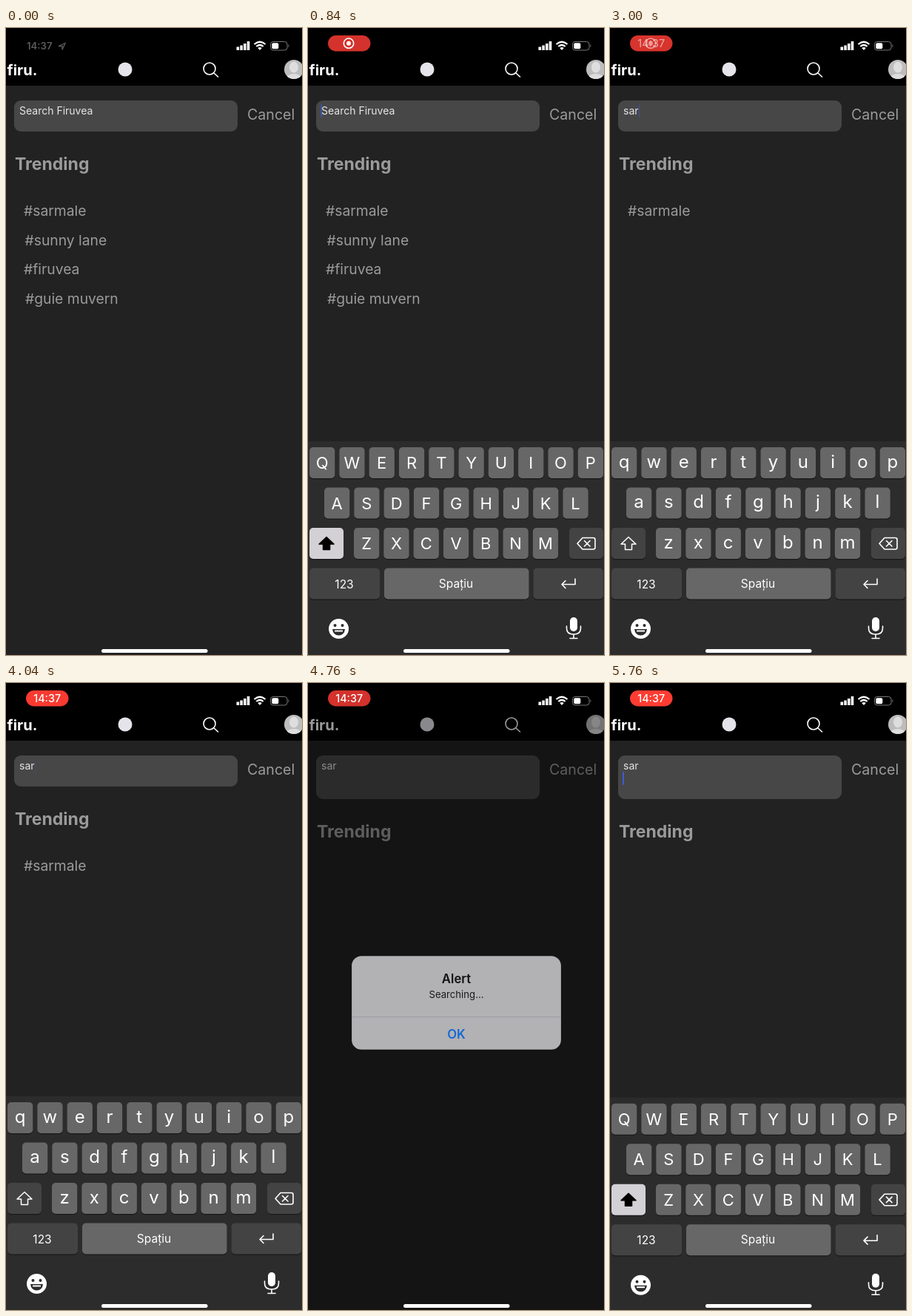
Recreate the animation shown at these times as an HTML page. Size 400 by 848 pixels, loop 5800 ms.

```html
<!DOCTYPE html>
<html lang="ro">
<head>
<meta charset="utf-8">
<title>Search</title>
<style>
html, body { margin: 0; width: 100%; height: 100%; overflow: hidden; background: #000; }
svg { display: block; width: 400px; height: 848px; font-family: Inter, "Open Sans", sans-serif; }
.mid { text-anchor: middle; }
.line { fill: none; stroke: #fff; stroke-width: 1.6; stroke-linecap: round; stroke-linejoin: round; }
</style>
</head>
<body>
<svg viewBox="0 0 400 848">
  <rect width="400" height="848" fill="#222"/>
  <rect width="400" height="78" fill="#000"/>

  <text x="1.5" y="64" font-size="20" font-weight="700" fill="#fff">firu.</text>
  <circle cx="161" cy="56" r="9.5" fill="#e4e4ea"/>
  <g class="line"><circle cx="275" cy="55" r="8"/><path d="M281 61l5.500 5"/></g>
  <clipPath id="face"><circle cx="389" cy="56" r="13"/></clipPath>
  <g clip-path="url(#face)">
    <rect x="375" y="42" width="28" height="28" fill="#bdbdbd"/>
    <ellipse cx="389" cy="53" rx="6" ry="7.500" fill="#dedede"/>
    <ellipse cx="389" cy="69" rx="11" ry="7" fill="#dedede"/>
  </g>

  <rect id="field" x="11" y="98" width="302" height="42" rx="9" fill="#474747"/>
  <text id="query" x="18" y="117" font-size="14" fill="#e6e6e6"></text>
  <rect id="cursor" y="103" width="2" height="18" rx="1" fill="#3b5ce0"/>
  <text x="326" y="124" font-size="19.600" fill="#9b9b9b">Cancel</text>
  <g id="results" fill="#9b9b9b">
    <text x="12" y="192" font-size="23" font-weight="700">Trending</text>
    <g id="tags" font-size="19.300"></g>
  </g>

  <rect id="dim" width="400" height="848" fill="#000"/>
  <g id="alert">
    <rect x="61" y="370" width="279" height="125" rx="13" fill="#bebdc0"/>
    <path d="M61 451.500H340" stroke="#a5a5a9"/>
    <g class="mid">
      <text x="200.500" y="406" font-size="16.500" font-weight="600" fill="#111">Alert</text>
      <text x="200.500" y="426.500" font-size="13" fill="#1c1c1c">Searching...</text>
      <text x="200.500" y="480" font-size="16.500" font-weight="600" fill="#1470e6">OK</text>
    </g>
  </g>

  <g id="keyboard">
    <rect y="559" width="400" height="300" fill="#2c2c2c"/>
    <g id="keys" class="mid" fill="#fff"></g>
    <path id="shift" d="M25 688.500l-10 9.500h5.500v7.500h9V698h5.500z" stroke-width="1.500" stroke-linejoin="round"/>
    <path class="line" d="M371 689.500h14.500q2.500 0 2.500 2.500v10.500q0 2.500-2.500 2.500H371l-7-7.800zM373.500 693.500l7.500 7.500m0-7.500l-7.500 7.500"/>
    <path class="line" d="M361 745v7.500H343m5-5l-5 5 5 5"/>
    <circle cx="41.500" cy="812.500" r="13.500" fill="#fff"/>
    <g fill="#2c2c2c">
      <circle cx="36.500" cy="808" r="2"/><circle cx="46.500" cy="808" r="2"/>
      <path d="M33 813h17q-1 8.500-8.500 8.500T33 813z"/>
    </g>
    <path d="M36 815.500h11" stroke="#fff" stroke-width="2"/>
    <rect x="354" y="797" width="10" height="19" rx="5" fill="#fff"/>
    <path class="line" d="M349.500 809v3q0 8 9.500 8t9.500-8v-3M359 820v5.500m-5 0h10"/>
  </g>

  <g id="clock" fill="#5c5c5c">
    <text x="28" y="29" font-size="13.200" font-weight="600">14:37</text>
    <path d="M71 24.500l9-4-4 9v-5z" fill="none" stroke="#5c5c5c" stroke-width="1.300"/>
  </g>
  <g id="pill">
    <rect id="pillBack" x="27" y="10" width="57.500" height="21.500" rx="10.750"/>
    <g id="record">
      <circle class="line" cx="55" cy="20.700" r="6.700"/>
      <circle cx="55" cy="20.700" r="3" fill="#fff"/>
    </g>
    <text id="time" class="mid" x="55.700" y="26" font-size="14.300" font-weight="500" fill="#fff">14:37</text>
  </g>
  <g fill="#fff">
    <path d="M311.500 25.500h3.600V30h-3.600zM316.300 23.500h3.600V30h-3.600zM321 21h3.600v9H321zM325.700 18h3.600v12h-3.600z"/>
    <path d="M343 30l-2.800-3q2.800-2.200 5.600 0z"/>
    <path d="M338.300 25q4.700-4 9.400 0M335.500 22q7.500-6.500 15 0" fill="none" stroke="#fff" stroke-width="2.200"/>
    <rect x="357.500" y="18.500" width="22.500" height="11.500" rx="3.500" fill="none" stroke="#777"/>
    <rect x="359.300" y="20.300" width="9" height="8" rx="1.800"/>
    <path d="M381.500 22q2 2.200 0 4.500z" fill="#777"/>
  </g>
  <rect x="129" y="840" width="143.500" height="5" rx="2.500" fill="#fff"/>
</svg>
<script>
const LOOP = 5800;
const KEYBOARD_HEIGHT = 289;
const TAGS = [["sarmale", 24], ["sunny lane", 25.5], ["firuvea", 24], ["guie muvern", 26]];
const TYPED = [[1040, "s"], [1700, "sa"], [2480, "sar"], [4340, "sar\n"]];
const PRESSES = [["s", 1000], ["a", 1660], ["r", 2450], ["return", 4290]];
const CURSOR_RESETS = [80, 1040, 1700, 2480, 4340, 5355];

const $ = id => document.getElementById(id);
const set = (el, attrs) => { for (const k in attrs) el.setAttribute(k, attrs[k]); return el; };
const add = (parent, tag, attrs, text = "") => {
  const el = set(document.createElementNS("http://www.w3.org/2000/svg", tag), attrs);
  el.textContent = text;
  return parent.appendChild(el);
};
const ramp = (t, start, length) => Math.min(1, Math.max(0, (t - start) / length));
const easeOut = (t, start, length) => 1 - (1 - ramp(t, start, length)) ** 3;

const keys = {};
function addKey(name, x, y, w, fill) {
  add($("keys"), "rect", { x, y: y + 1.2, width: w, height: 42, rx: 5, fill: "#191919" });
  keys[name] = { fill, box: add($("keys"), "rect", { x, y, width: w, height: 42, rx: 5, fill }) };
}
["qwertyuiop", "asdfghjkl", "zxcvbnm"].forEach((row, r) =>
  [...row].forEach((c, i) => {
    const x = [2, 22, 62][r] + 40.3 * i, y = 567 + 54.5 * r;
    addKey(c, x, y, 34.3, "#676767");
    keys[c].label = add($("keys"), "text", { x: x + 17.1 });
    keys[c].y = y;
  }));
addKey("shift", 2, 676, 46, "#434343");
addKey("delete", 353, 676, 46, "#434343");
addKey("123", 2, 730.5, 95, "#434343");
addKey("space", 103, 730.5, 195.5, "#676767");
addKey("return", 304.5, 730.5, 94.5, "#434343");
add($("keys"), "text", { x: 49, y: 757.5, "font-size": 15.5 }, "123");
add($("keys"), "text", { x: 200, y: 756.5, "font-size": 15.5 }, "Spațiu");

const tags = TAGS.map(([name, x], i) => add($("tags"), "text", { x, y: 254 + 39.7 * i }, "#" + name));

function drawKeyboard(t, caps) {
  const shown = t < 4400 ? easeOut(t, 80, 495)
    : t < 5355 ? 1 - easeOut(t, 4400, 350)
    : easeOut(t, 5355, 495);
  set($("keyboard"), { transform: `translate(0 ${KEYBOARD_HEIGHT * (1 - shown)})` });
  for (const name in keys) {
    const { box, fill, label, y } = keys[name];
    const pressed = PRESSES.some(([key, at]) => key === name && t >= at && t < at + 110);
    set(box, { fill: pressed ? "#4b4b4b" : fill });
    if (!label) continue;
    label.textContent = caps ? name.toUpperCase() : name;
    set(label, { y: y + (caps ? 29.3 : 27.5), "font-size": caps ? 22 : 24 });
  }
  if (caps) set(keys.shift.box, { fill: "#d3d1d6" });
  set($("shift"), caps ? { fill: "#000", stroke: "#000" } : { fill: "none", stroke: "#fff" });
}

function drawCursor(t, text) {
  const reset = CURSOR_RESETS.filter(at => at <= t).pop();
  const phase = (t - reset) % 1000 / 1000;
  const blink = phase < 0.6 ? 1 - ramp(phase, 0.4, 0.18) : ramp(phase, 0.65, 0.2);
  const focused = t >= 80 && (t < 4400 || t >= 5355);
  const broken = text.endsWith("\n");
  const x = text && !broken ? 18 + $("query").getComputedTextLength() : 17;
  set($("cursor"), { x, y: broken ? 120 : 103, opacity: focused ? blink : 0 });
}

function drawAlert(t) {
  const shown = easeOut(t, 4525, 400);
  const left = 1 - easeOut(t, 5355, 495);
  const scale = 1 + 0.2 * (1 - shown);
  set($("dim"), { opacity: 0.43 * shown * left });
  set($("alert"), {
    opacity: shown * left ** 1.4,
    transform: `translate(200.5 432.5) scale(${scale}) translate(-200.5 -432.5)`
  });
}

function drawStatus(t) {
  const glow = (1 - Math.cos((t - 840) / 1960 * 2 * Math.PI)) / 2;
  const mix = (a, b) => a + (b - a) * glow;
  const swap = ramp(t, 2900, 200);
  set($("clock"), { opacity: 1 - ramp(t, 0, 240) });
  set($("pill"), { opacity: ramp(t, 160, 280) });
  set($("pillBack"), { fill: `rgb(${mix(212, 255)},${mix(50, 60)},${mix(44, 50)})` });
  set($("record"), { opacity: 1 - swap });
  set($("time"), { opacity: swap });
}

function draw(now) {
  const t = now % LOOP;
  const text = TYPED.filter(([at]) => at <= t).map(([, s]) => s).pop() || "";
  const broken = text.endsWith("\n");
  $("query").textContent = text.trim() || "Search Firuvea";
  set($("field"), { height: broken ? 59 : 42 });
  set($("results"), { transform: `translate(0 ${broken ? 17 : 0})` });
  tags.forEach((tag, i) => set(tag, { opacity: TAGS[i][0].startsWith(text) ? 1 : 0 }));
  drawKeyboard(t, !text || broken);
  drawCursor(t, text);
  drawAlert(t);
  drawStatus(t);
}

const start = performance.now();
function tick() {
  draw(performance.now() - start);
  requestAnimationFrame(tick);
}
tick();
</script>
</body>
</html>
```
